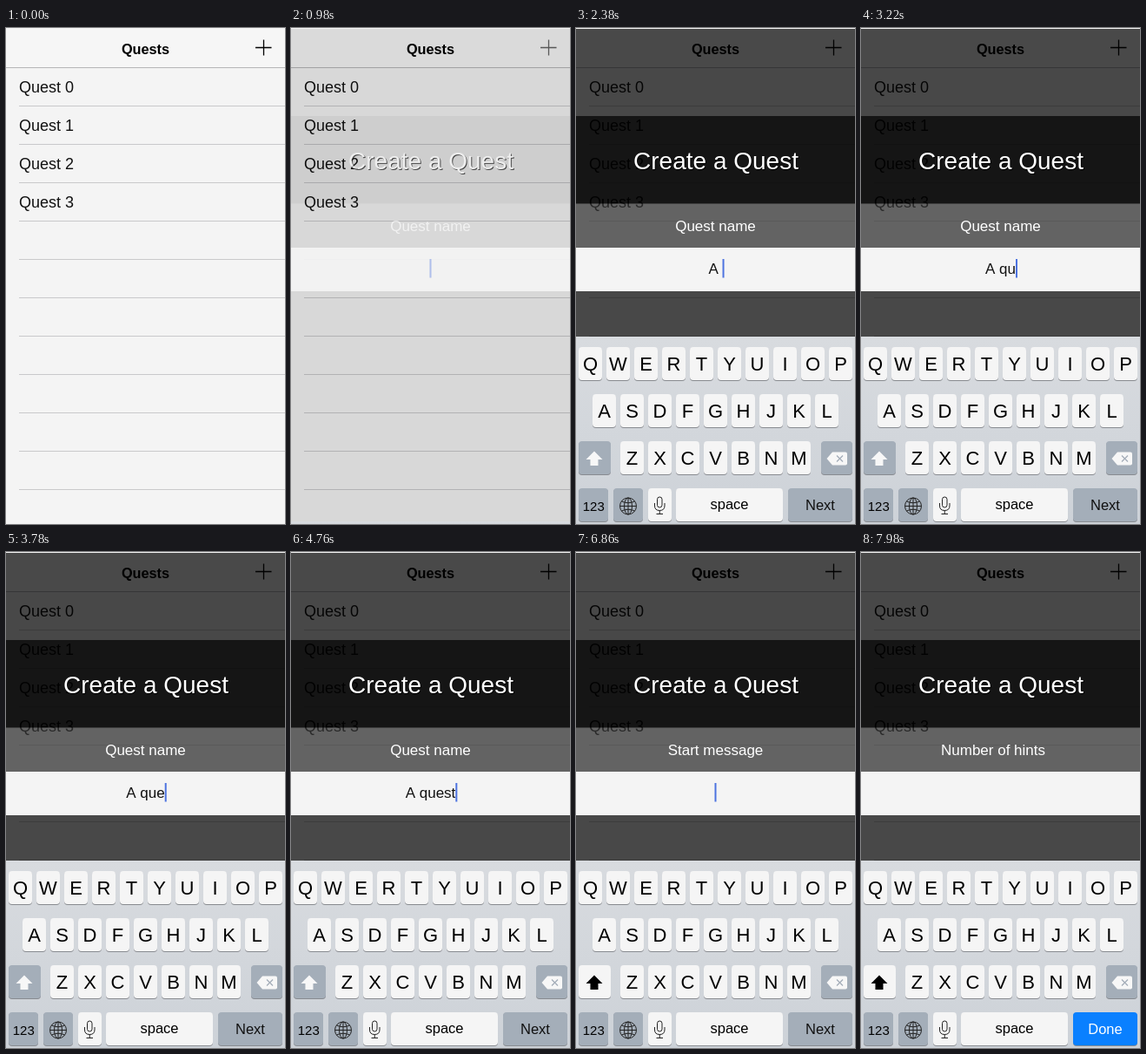
Write an HTML page that moves like this. It is 321 by 569 pixels and loops after 8 s.

```html
<!DOCTYPE html>
<html lang="en">
<head>
<meta charset="utf-8">
<title>Quests</title>
<style>
  html, body { margin: 0; width: 100%; height: 100%; overflow: hidden; background: #f4f4f4; }
  svg { display: block; width: 100vw; height: 100vh; font: 17px "Liberation Sans", Arial, sans-serif; }
  .mid { text-anchor: middle; }
  .line { stroke: #c9c9cb; }
  .key { fill: #f5f5f5; }
  .key.dark { fill: #a4aeb9; }
  .key.blue { fill: #0a80ff; }
  .shade { fill: #888b90; }
  .icon { fill: none; stroke: #222; }
  .letter { font-size: 22px; }

  .fade, #keyboard, #plus { animation: 8s linear infinite; }
  #plus { animation-name: press; }
  #dim { animation-name: dim; }
  .band { animation-name: band; }
  .words { animation-name: words; }
  #field { animation-name: field; }
  #caret { animation-name: caret; }
  #keyboard { animation-name: rise; }

  @keyframes press {
    0%, 7% { opacity: 1; }
    8.75% { opacity: .3; }
    12.25% { opacity: .6; }
    15.75%, 100% { opacity: 1; }
  }
  @keyframes dim {
    0%, 10.5% { opacity: 0; }
    12.25% { opacity: .11; }
    14% { opacity: .4; }
    15.75% { opacity: .64; }
    17.5%, 100% { opacity: .7; }
  }
  @keyframes band {
    0%, 10.5% { opacity: 0; }
    12.25% { opacity: .06; }
    14% { opacity: .5; }
    15.75% { opacity: .9; }
    17.5%, 100% { opacity: 1; }
  }
  @keyframes words {
    0%, 10.5% { opacity: 0; }
    12.25% { opacity: .65; }
    14%, 100% { opacity: 1; }
  }
  @keyframes field {
    0%, 10.5% { opacity: 0; }
    12.25% { opacity: .94; }
    14%, 100% { opacity: 1; }
  }
  @keyframes caret {
    0%, 10.5% { opacity: 0; }
    12.25% { opacity: .4; }
    14%, 100% { opacity: 1; }
  }
  @keyframes rise {
    0%, 12.1% { transform: translateY(215px); }
    12.25% { transform: translateY(213px); }
    14% { transform: translateY(52px); }
    15.75% { transform: translateY(2px); }
    17.5%, 100% { transform: none; }
  }
</style>
</head>
<body>
<svg viewBox="0 0 321 569" preserveAspectRatio="none">
  <defs>
    <linearGradient id="tray" x2="0" y2="1">
      <stop stop-color="#d8dbdf"/>
      <stop offset="1" stop-color="#cdd2d8"/>
    </linearGradient>
  </defs>

  <rect width="321" height="569" fill="#f4f4f4"/>
  <rect y="1" width="321" height="44" fill="#f6f6f6"/>
  <path d="M0 45.5H321" stroke="#b6b6b8"/>
  <text class="mid" x="160.5" y="29.5" font-size="16.3" font-weight="700">Quests</text>
  <g id="list" font-size="18"></g>

  <rect id="dim" class="fade" y="1" width="321" height="568"/>
  <path id="plus" d="M287 22.5H305.500M296.500 13.500V31.500" stroke="#000" stroke-width="1.3"/>
  <g class="fade band">
    <rect y="101" width="321" height="100.500" fill-opacity=".7"/>
    <rect y="201.500" width="321" height="50.500" fill="#fff" fill-opacity=".15"/>
  </g>
  <rect id="field" class="fade" y="252" width="321" height="50" fill="#f4f4f4"/>
  <g class="fade words mid" fill="#fff">
    <text x="162" y="162.500" font-size="28" fill="#000">Create a Quest</text>
    <text x="161" y="161.500" font-size="28">Create a Quest</text>
    <text id="label" y="233"></text>
  </g>
  <text id="entry" class="mid" x="160.500" y="282" fill="#111" xml:space="preserve"></text>
  <g class="fade" id="caret"><rect id="bar" y="265" width="2" height="21.500" fill="#4d73e0"/></g>

  <g id="keyboard">
    <rect y="354" width="321" height="215" fill="url(#tray)"/>
    <g id="keys"></g>
    <path id="arrow" d="M21 485.500L30.500 495H25.500V502H16.500V495H11.500Z"/>
    <path d="M288.500 494L295 486.500H310Q312 486.500 312 488.500V499.500Q312 501.500 310 501.500H295Z" fill="#f7f7f7"/>
    <path d="M300 490.500L307 497.500M307 490.500L300 497.500" stroke="#a4aeb9" stroke-width="1.300"/>
    <g class="icon">
      <circle cx="60" cy="548.500" r="9.500"/>
      <ellipse cx="60" cy="548.500" rx="4.500" ry="9.500"/>
      <path d="M60 539V558M50.500 548.500H69.500M52.500 543Q60 546.500 67.500 543M52.500 554Q60 550.500 67.500 554"/>
      <rect x="93.500" y="538" width="5.500" height="12" rx="2.750"/>
      <path d="M90.500 545V548Q90.500 553.500 96.250 553.500T102 548V545M96.250 553.500V557.500M92.500 557.500H100"/>
    </g>
    <g class="mid" font-size="16.500">
      <text x="20.300" y="553.500" font-size="15">123</text>
      <text x="176.500" y="552">space</text>
      <text id="action" x="281" y="552.500"></text>
    </g>
  </g>
</svg>
<script>
  const byId = id => document.getElementById(id);

  function add(parent, tag, attrs, text = '') {
    const node = document.createElementNS('http://www.w3.org/2000/svg', tag);
    for (const name in attrs) node.setAttribute(name, attrs[name]);
    node.textContent = text;
    parent.append(node);
    return node;
  }

  function addKey(x, y, width, dark = false) {
    add(byId('keys'), 'rect', { class: 'shade', x, y: y + 1, width, height: 38, rx: 4 });
    return add(byId('keys'), 'rect', { class: dark ? 'key dark' : 'key', x, y, width, height: 38, rx: 4 });
  }

  for (let row = 0; row < 11; row++) {
    const y = 89.5 + row * 44;
    add(byId('list'), 'path', { class: 'line', d: `M15 ${y}H321` });
    if (row < 4) add(byId('list'), 'text', { x: 15, y: y - 15.5, fill: '#111' }, `Quest ${row}`);
  }

  [['QWERTYUIOP', 3], ['ASDFGHJKL', 19], ['ZXCVBNM', 51]].forEach(([letters, left], row) => {
    [...letters].forEach((letter, i) => {
      const x = left + i * 32, y = 366 + row * 54;
      addKey(x, y, 27);
      add(byId('keys'), 'text', { class: 'letter mid', x: x + 13.5, y: y + 27 }, letter);
    });
  });
  const shiftKey = addKey(3, 474, 37);
  addKey(282, 474, 36, true);
  addKey(3, 528, 34, true);
  addKey(43, 528, 34, true);
  addKey(83, 528, 27);
  addKey(115, 528, 123);
  const actionKey = addKey(244, 528, 74, true);

  const LOOP = 8000, PHRASE = 'A quest';
  const strokes = [1950, 2250, 2750, 3200, 3600, 4000, 4350];
  const steps = [
    { at: 0, label: 'Quest name', x: 160.5 },
    { at: 5460, label: 'Start message', x: 160.5 },
    { at: 7440, label: 'Number of hints', x: 152 }
  ];
  const entry = byId('entry'), label = byId('label'), bar = byId('bar'), action = byId('action');
  let shown = '';

  function render() {
    const t = performance.now() % LOOP;
    const step = steps.filter(s => s.at <= t).pop();
    const typed = step === steps[0] ? strokes.filter(s => s <= t).length : 0;
    const state = step.label + typed;

    if (state !== shown) {
      shown = state;
      const last = step === steps[2];
      label.textContent = step.label;
      label.setAttribute('x', step.x);
      entry.textContent = PHRASE.slice(0, typed).replace(/ /g, '\u00a0');
      const width = typed ? entry.getComputedTextLength() : 0;
      bar.setAttribute('x', 159.5 + width / 2 + (typed ? 1 : 0));
      shiftKey.setAttribute('class', typed ? 'key dark' : 'key');
      byId('arrow').setAttribute('fill', typed ? '#f7f7f7' : '#000');
      actionKey.setAttribute('class', last ? 'key blue' : 'key dark');
      action.textContent = last ? 'Done' : 'Next';
      action.setAttribute('fill', last ? '#fff' : '#111');
    }

    const since = typed ? strokes[typed - 1] : step.at || 840;
    bar.setAttribute('visibility', (t - since) % 1000 < 500 ? 'visible' : 'hidden');
    requestAnimationFrame(render);
  }
  render();
</script>
</body>
</html>
```
